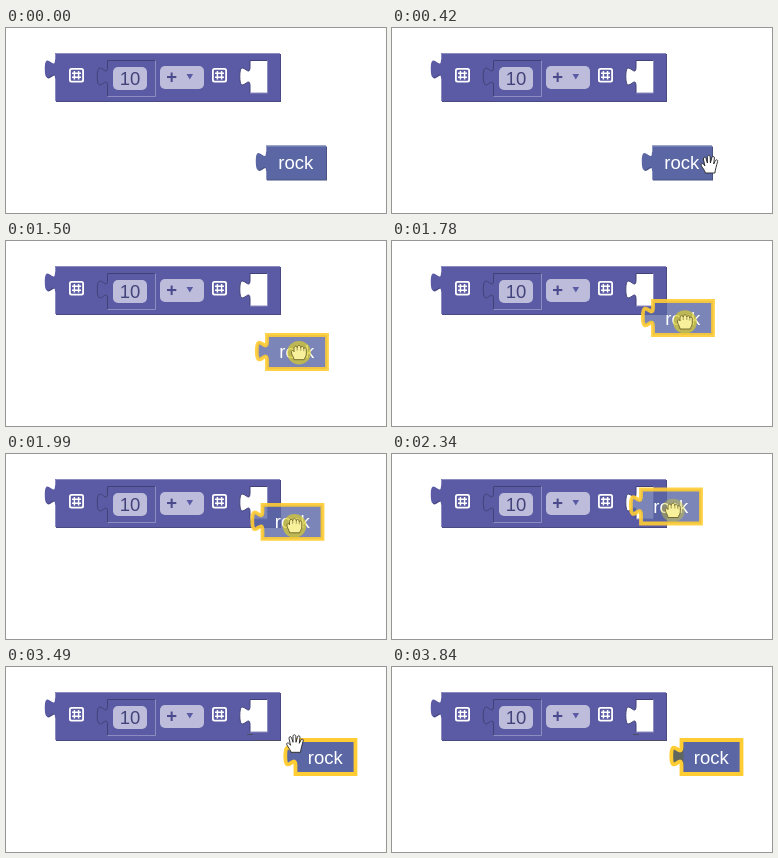
These frames come from a looping animation (380x185 px, 4.3 s). An HTML page with a canvas:

```html
<!DOCTYPE html>
<html lang="en">
<head>
<meta charset="utf-8">
<style>
html, body { margin: 0; width: 100%; height: 100%; overflow: hidden; background: #fff; }
canvas { display: block; }
</style>
</head>
<body>
<canvas id="stage" width="380" height="185"></canvas>
<script>
const c = document.getElementById('stage').getContext('2d');
const LOOP = 4300, STEP = 70;
const FONT = '18.5px "Liberation Sans", Arial, sans-serif';
const MAIN = '#5b5ba5', ROCK = '#5b67a5', YELLOW = '#fc3';
const TAB = 'c0,-12.8 -10.2,10.2 -10.2,-9.6 s10.2,3.2 10.2,-9.6';
const ARROW = new Path2D('M0,0 V15.5 L3.6,12.2 L6.2,18 L8.6,17 L6.1,11.2 H11 Z');
const FIST = new Path2D('M-5,7 C-5,4 -8,2 -7.5,-1 C-7,-3 -5,-2 -5,-1 V-4 C-5,-7 -2,-7 -1.8,-5 C-1.5,-8 1.5,-8 1.8,-5 C2,-7 4.6,-7 4.8,-4 C5,-5.5 7.3,-5 7.3,-3 V1 C7.3,4 5.5,5 5.2,7 Z');
const PALM = new Path2D('M-4,8 C-5,4 -9,1 -8.2,-.8 C-7.5,-2.2 -5.5,-1 -4.5,1 L-6,-6 C-6,-8 -4,-8.3 -3.4,-6.5 L-2,-2 V-8 C-2,-10 .7,-10 .8,-8 L1,-2 L2.5,-7.5 C3,-9.2 5.2,-8.7 5,-7 L4.3,-1 L6,-4.5 C7,-6 8.8,-5 8.2,-3.4 C7,1 6,4 5.5,8 Z');

const lerp = (a, b, p) => a + (b - a) * p;

// Progress in discrete steps: 0 before the start, 1 from the last step on.
const steps = (t, start, n) => Math.max(0, Math.min(n, Math.floor((t - start) / STEP) + 1)) / n;

const outline = (w, h) => new Path2D(`M0,0 h${w} v${h} h${-w} V25.6 ${TAB} Z`);

function at(x, y, draw) {
  c.save();
  c.translate(x, y);
  draw();
  c.restore();
}

function stroke(path, color, width = 1) {
  c.strokeStyle = color;
  c.lineWidth = width;
  c.stroke(path);
}

function fill(path, color) {
  c.fillStyle = color;
  c.fill(path);
}

function box(x, y, w, h, r, color) {
  const p = new Path2D();
  p.roundRect(x, y, w, h, r);
  fill(p, color);
}

function text(s, x, y, color, weight = '') {
  c.font = `${weight} ${FONT}`;
  c.fillStyle = color;
  c.fillText(s, x, y);
}

function block(x, y, w, h, color, dark, light) {
  at(x + 1, y + 1, () => fill(outline(w, h), dark));
  at(x, y, () => {
    fill(outline(w, h), color);
    stroke(new Path2D(`M${w},.5 H.5 V6.4 M.5,${h} V25.6`), light);
  });
}

function socket(x, y, w, h, color) {
  at(x, y, () => {
    fill(outline(w, h), color);
    stroke(new Path2D(`M${w},0 H0 V6.4 M0,${h} V25.6 ${TAB}`), '#414178');
    stroke(new Path2D(`M${w},0 V${h} H0`), '#8c8cc0');
  });
}

function icon(x, y) {
  at(x, y, () => {
    box(0, 0, 15, 14.5, 2.5, '#fff');
    box(1.8, 1.8, 11.4, 10.9, 1, MAIN);
    stroke(new Path2D('M5.4,3 V11.5 M9.6,3 V11.5 M3,5.2 H12 M3,9.3 H12'), '#fff', 1.5);
  });
}

function drawMain(bumped) {
  block(49, 25, 225, 48, MAIN, '#494984', '#8c8cc0');
  icon(63, 40);
  icon(206, 40);
  socket(101.5, 32.5, 48, 36, MAIN);
  box(107, 39, 34, 23, 5, '#bdbddb');
  text('10', 113.7, 57, '#43437c');
  box(154, 38, 44, 23, 5, '#bdbddb');
  text('+', 160.3, 55, '#4a4a8c', 'bold');
  fill(new Path2D('M180.5,46 h6.6 l-3.3,5.4 z'), MAIN);
  socket(244, 32.5, 17.5, 32.5, '#fff');
  if (bumped) stroke(new Path2D('M241,67.5 h6 M247,73.5 h27'), '#4d4d66');
}

function drawRock(x, y, selected, dragging, greyTab) {
  if (dragging) {
    at(x, y, () => {
      c.globalAlpha = 0.8;
      fill(outline(60, 34), ROCK);
    });
  } else {
    block(x, y, 60, 34, ROCK, '#495284', '#8c95c0');
  }
  at(x, y, () => {
    if (greyTab) fill(new Path2D(`M2,25.6 H0 ${TAB} H2 Z`), '#5f675f');
    if (dragging) c.globalAlpha = 0.9;
    if (selected) stroke(outline(60, 34), YELLOW, 3.8);
  });
  text('rock', x + 12.3, y + 23.5, '#fff');
}

function pointer(x, y, shape, color = '#fff', line = '#222') {
  at(x, y, () => {
    fill(shape, color);
    stroke(shape, line, 0.9);
    if (shape === FIST) stroke(new Path2D('M-1.8,-5 V-2 M1.8,-5 V-2 M4.8,-4 V-1.5'), line, 0.6);
  });
}

// Drag up, then left into the socket; a lower power starts sooner.
function dragOffset(t, power) {
  const up = steps(t, 1290, 8) ** power, left = steps(t, 1850, 8);
  return [lerp(Math.min(1, up * 2.4), -11, left), lerp(-57.5 * up, -82, left)];
}

function drawPointer(t) {
  if (t < 210) return;
  if (t < 890) {
    const p = Math.min(5, Math.floor((t - 210) / STEP)) / 5;
    const x = lerp(357, 291, p);
    pointer(x, 137, x < 321 ? PALM : ARROW);
  } else if (t < 2880) {
    const [dx, dy] = dragOffset(t, 1.1);
    const x = 292 + dx, y = 138.5 + dy;
    const glow = t < 1290 ? 0.55 : t < 2340 ? 0.7 : t < 2680 ? 0.4 : 0;
    c.fillStyle = `rgba(218,205,40,${glow})`;
    c.beginPath();
    c.arc(x, y, 11.8, 0, 7);
    c.fill();
    if (glow) pointer(x, y, FIST, '#f8f09a', '#6b6428');
    else pointer(x, y, PALM);
  } else if (t < 3840) {
    const p = steps(t, 3490, 5);
    const x = lerp(283, 313, p), y = lerp(58, 154.5, p);
    pointer(x, y, y > 71 && y < 108 ? PALM : ARROW);
  }
}

const start = performance.now();

function frame() {
  const t = (performance.now() - start) % LOOP;
  const bumped = t >= 2880;
  const [dx, dy] = bumped ? [29.5, -44.5] : dragOffset(t, 1.29);
  c.fillStyle = '#fff';
  c.fillRect(0, 0, 380, 185);
  drawMain(bumped);
  drawRock(260 + dx, 117.5 + dy, t >= 890, t >= 1290 && t < 2680, t >= 3560);
  drawPointer(t);
  requestAnimationFrame(frame);
}
frame();
</script>
</body>
</html>
```
